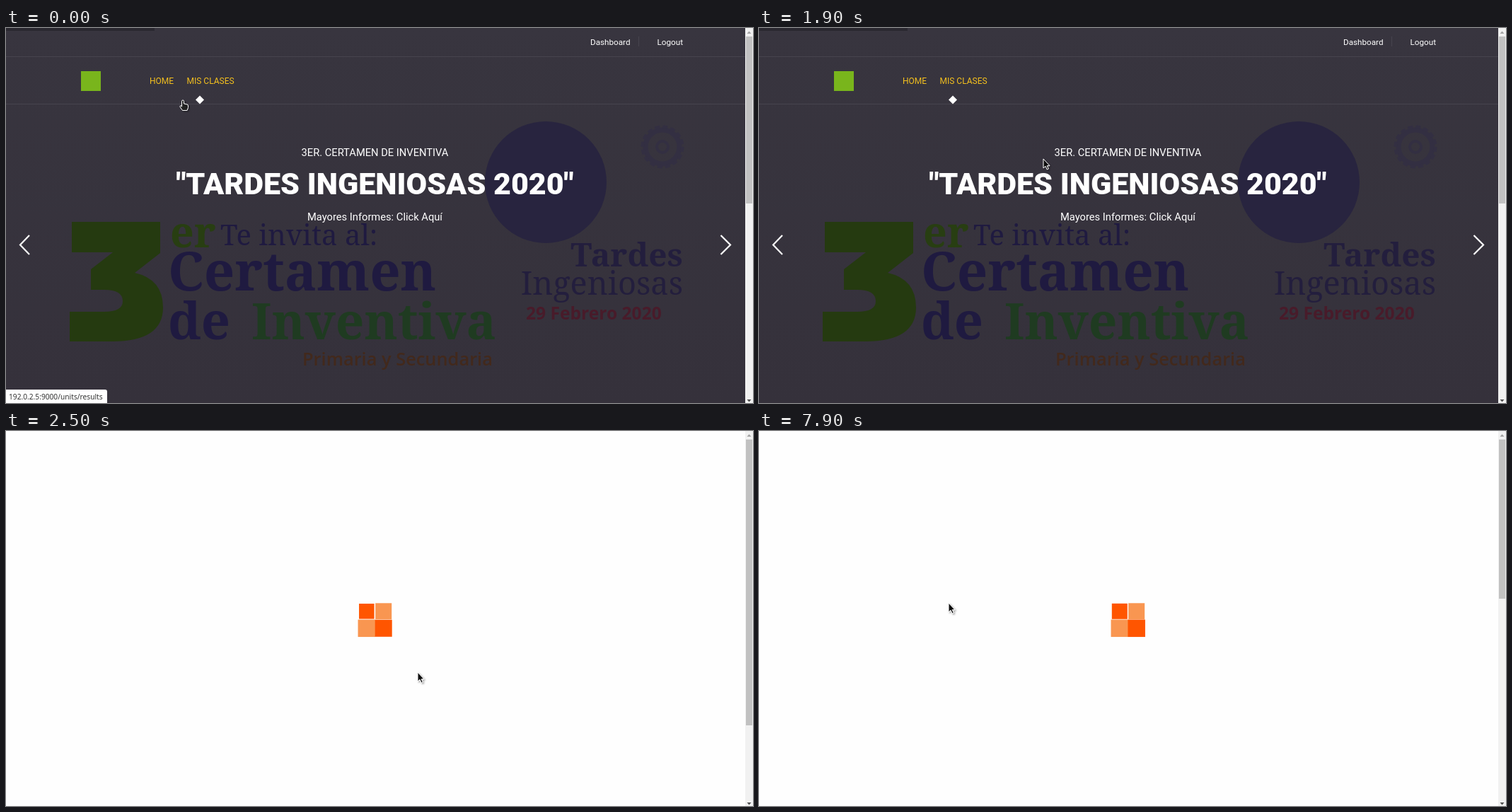
An HTML page for the animation above (8000 ms loop, 1056 by 530 pixels).

```html
<!DOCTYPE html>
<html lang="es">
<head>
<meta charset="utf-8">
<style>
  html, body { margin: 0; width: 100%; height: 100%; overflow: hidden; background: #fefefe; }
  svg { display: block; width: 1056px; height: 530px; }
  text { white-space: pre; }
  .ui { font-family: Roboto, sans-serif; fill: #fff; }
  .nav { font-size: 12px; fill: #f4c01e; }
  .mid { text-anchor: middle; }
  .slab { font-family: "Noto Serif", serif; font-weight: 700; }
  .sans { font-family: "Open Sans", sans-serif; }
</style>
</head>
<body>
<svg viewBox="0 0 1056 530">
  <defs>
    <linearGradient id="shade" x1="0" y1="0" x2="0" y2="1">
      <stop offset="0" stop-color="#38353f"/>
      <stop offset="1" stop-color="#35313b"/>
    </linearGradient>
    <filter id="soft"><feGaussianBlur stdDeviation=".7"/></filter>
    <filter id="drop" x="-50%" y="-50%" width="220%" height="220%">
      <feDropShadow dx="1.5" dy="1.5" stdDeviation="1" flood-opacity=".4"/>
    </filter>
  </defs>

  <rect width="1056" height="530" fill="#fefefe"/>

  <g id="page">
    <rect width="1045" height="530" fill="url(#shade)"/>
    <rect width="210" height="4" fill="#2a2830"/>
    <path d="M0 40.5H1045M0 107.5H1045M894.5 12V26" stroke="#47444e"/>

    <!-- dimmed banner picture -->
    <g filter="url(#soft)">
      <g fill="none" stroke="#332f42">
        <circle cx="928" cy="168" r="24" stroke-width="7"/>
        <circle cx="928" cy="168" r="28" stroke-width="5" stroke-dasharray="7 4"/>
        <circle cx="928" cy="168" r="8" stroke-width="4"/>
      </g>
      <circle cx="763" cy="218" r="86" fill="#28243f"/>
      <path fill="#253a10" d="M93 274H218V318L182 346Q222 355 222 395Q222 443 150 443H90V401H139Q165 401 165 386Q165 370 139 370H120V341L151 317H93Z"/>
      <g class="slab" fill="#1f1a40">
        <text x="232" y="310" font-size="59" fill="#283e12">er</text>
        <text x="303" y="307" font-size="40" style="font-weight:400">Te invita al:</text>
        <text x="229" y="371" font-size="76">Certamen</text>
        <text x="229" y="440" font-size="72">de</text>
        <text x="347" y="440" font-size="71" fill="#1f3b21">Inventiva</text>
        <text x="957" y="337" font-size="46" text-anchor="end" fill="#231e3d">Tardes</text>
        <text x="957" y="377" font-size="45" text-anchor="end" fill="#231e3d" style="font-weight:500">Ingeniosas</text>
      </g>
      <g class="sans">
        <text x="419" y="477" font-size="25.4" font-weight="600" fill="#42291c">Primaria y Secundaria</text>
        <text x="735" y="412" font-size="24.6" font-weight="700" fill="#481b2a">29 Febrero 2020</text>
      </g>
    </g>

    <rect x="106" y="61" width="28" height="28" fill="#79b51c"/>
    <g class="ui">
      <text x="826" y="24" font-size="11.7">Dashboard</text>
      <text x="920.5" y="24" font-size="11.7">Logout</text>
      <text class="nav" x="203" y="78.5">HOME</text>
      <text class="nav" x="255.5" y="78.5">MIS CLASES</text>
      <text class="mid" x="521.5" y="180.5" font-size="14.7">3ER. CERTAMEN DE INVENTIVA</text>
      <text class="mid" x="521.5" y="235" font-size="43" font-weight="800">"TARDES INGENIOSAS 2020"</text>
      <text class="mid" x="521.5" y="271.5" font-size="14.7">Mayores Informes: Click Aquí</text>
    </g>
    <path d="M274 95.5L280 101.5L274 107.5L268 101.5Z" fill="#fff"/>
    <path d="M33 293L20 306.5L33 320M1010.500 293L1024 306.5L1010.500 320" fill="none" stroke="#fff" stroke-width="2.2"/>

    <g id="status">
      <path d="M0 511H140Q143 511 143 514V530H0Z" fill="#fff"/>
      <text x="4" y="525" font-family="Noto Sans, sans-serif" font-size="10.2" fill="#333">192.0.2.5:9000/units/results</text>
    </g>
  </g>

  <g id="loader"></g>

  <rect x="1045" width="11" height="530" fill="#f1f1f1"/>
  <rect id="thumb" x="1046" y="12" width="9" fill="#c1c1c1"/>
  <path d="M1047.500 8L1050.500 4.500L1053.500 8Z" fill="#a3a3a3"/>
  <path d="M1047.500 525L1050.500 528.500L1053.500 525Z" fill="#505050"/>

  <g id="cursor" stroke="#fff" stroke-linejoin="round" filter="url(#drop)">
    <path id="arrow" fill="#111" d="M0 0V13L3 10.300L5.200 15L7.300 14L5.200 9.700H9Z"/>
    <path id="hand" fill="#222" d="M-1.500 9V1.500Q-1.500 0 0 0T1.500 1.500V5L6 6Q7.500 6.300 7.500 8V10.500L6 14.500H-.500L-4 9.500Q-4.500 8 -3 7.700Z"/>
  </g>
</svg>
<script>
  const $ = id => document.getElementById(id);
  const show = (el, on) => el.setAttribute("display", on ? "inline" : "none");

  // [ms, x, y] of the pointer tip
  const moves = [
    [0, 250, 102], [300, 255, 97], [400, 274, 86], [500, 296, 79], [600, 295, 75], [700, 291, 74],
    [2400, 569, 358], [2500, 582, 341], [7100, 282, 252], [7400, 282, 250], [7900, 268, 243]
  ];
  // [ms, sizes of the four loader tiles]
  const pulses = [
    [2500, 21.5, 23, 24.5, 24], [7100, 20.5, 21, 23, 22.5],
    [7400, 20.500, 21.500, 23, 22.500], [7900, 22, 23, 24.5, 24.5]
  ];
  const last = (list, t) => list.filter(k => k[0] <= t).pop();

  const tiles = ["#ff5500", "#f99651", "#f99651", "#ff5500"].map(color => {
    const tile = document.createElementNS("http://www.w3.org/2000/svg", "rect");
    tile.setAttribute("fill", color);
    $("loader").append(tile);
    return tile;
  });

  function pointer(t) {
    if (t < 1700 || t >= 2400) return last(moves, t).slice(1);
    const p = (Math.floor(t / 100) - 16) / 7;
    const e = p * p * (3 - 2 * p);
    return [291 + 282 * e, 74 + 282 * e];
  }

  function draw(t) {
    show($("page"), t < 2400);
    show($("status"), t < 1300);
    $("status").setAttribute("opacity", t < 1200 ? 1 : 0.5);

    show($("hand"), t < 1000);
    show($("arrow"), t >= 1000);
    $("cursor").setAttribute("transform", `translate(${pointer(t)})`);
    $("thumb").setAttribute("height", t < 2400 ? 236 : t < 7100 ? 404 : 225);

    show($("loader"), t >= 2500);
    const sizes = last(pulses, t);
    if (sizes) tiles.forEach((tile, i) => {
      const s = sizes[i + 1];
      tile.setAttribute("x", 509.8 + i % 2 * 23.9 - s / 2);
      tile.setAttribute("y", 254.8 + (i >> 1) * 24 - s / 2);
      tile.setAttribute("width", s);
      tile.setAttribute("height", s);
    });
  }

  const start = performance.now();
  function tick() {
    draw((performance.now() - start) % 8000);
    requestAnimationFrame(tick);
  }
  tick();
</script>
</body>
</html>
```
